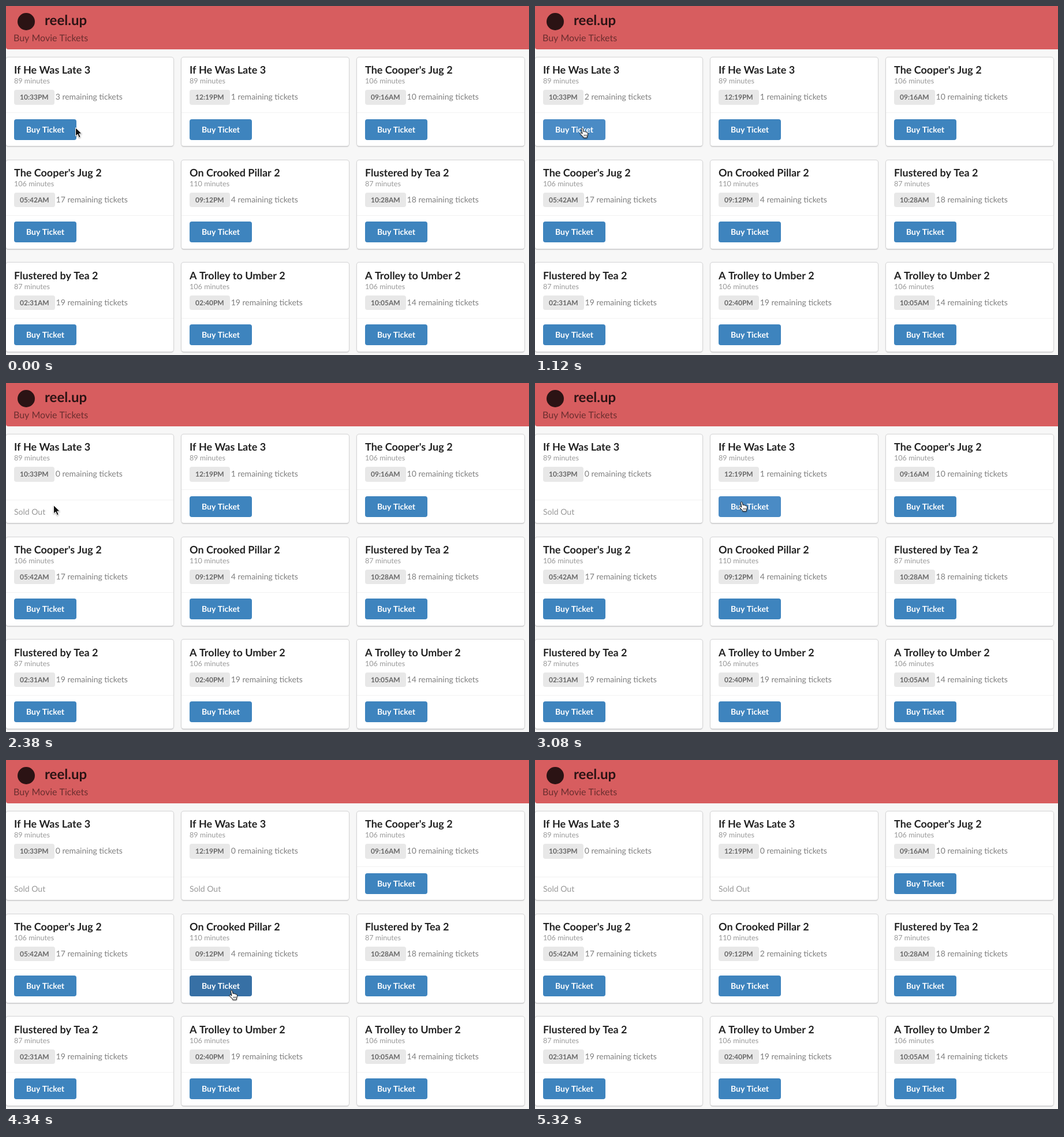
Recreate the animation shown at these times as an HTML page. Size 906 by 604 pixels, loop 6.35 s.

```html
<!DOCTYPE html>
<html lang="en">
<head>
<meta charset="utf-8">
<title>Buy Movie Tickets</title>
<style>
html, body { margin: 0; width: 100%; height: 100%; overflow: hidden; background: #f7f7f7; }
body { position: relative; font: 14px Lato, sans-serif; text-rendering: geometricPrecision; white-space: nowrap; }
body *, .cursor { position: absolute; }
header { left: 0; top: 0; width: 906px; height: 75px; background: #d75d5f; border-radius: 0 0 0 4px; }
.logo { left: 20px; top: 12px; width: 30px; height: 30px; border-radius: 50%; background: #2b1314; }
.brand { left: 67px; top: 10px; font: bold 24px/30px Lato, sans-serif; color: #2b1314; }
.tagline { left: 13px; top: 46px; font-size: 16px; line-height: 20px; color: #6b2e2f; }
.card { width: 290px; height: 153.5px; border-radius: 4px; background: #fff;
  box-shadow: 0 0 0 1px #d4d4d5, 0 2px 0 #d4d4d5, 0 1px 3px #d4d4d5; }
.card > * { left: 14px; }
.title { top: 11.35px; font: bold 18px/20px Lato, sans-serif; color: #222; }
.length { top: 33.4px; font-size: 12.6px; line-height: 16px; color: #999; }
.info { top: 56.4px; height: 25.3px; display: flex; color: #7f7f7f; }
.info * { position: static; line-height: 24px; }
.info .time { box-sizing: border-box; height: 25.3px; padding: 0 10px; margin-right: 2px; border-radius: 4px;
  background: #e8e8e8; font-size: 12px; line-height: 25px; font-weight: bold; color: #666; }
.card .rule { left: 0; top: 95.4px; width: 290px; height: 1px; background: #f2f2f2; }
.buy { top: 106.8px; width: 108px; height: 36px; border-radius: 4px; background: #3e84be;
  color: #fff; font-weight: bold; line-height: 36px; text-align: center; }
.gone { top: 124.7px; line-height: 18px; color: #999; display: none; }
.sold .rule { top: 113.4px; }
.sold .buy { display: none; }
.sold .gone { display: block; }
body i { position: static; display: inline-block; font-style: normal; }
.cursor { left: 0; top: 0; overflow: visible; filter: drop-shadow(0 1px 1px rgba(0,0,0,.35)); }
</style>
</head>
<body>
<header>
  <div class="logo"></div>
  <div class="brand">reel.up</div>
  <div class="tagline"><i>Buy</i> <i>Movie</i> <i>Tickets</i></div>
</header>
<svg id="arrow" class="cursor" width="14" height="20">
  <path d="M.5 .5V15.2L4 12 6.5 17.8 9.2 16.6 6.7 11H11.4Z" fill="#111" stroke="#fff"/>
</svg>
<svg id="hand" class="cursor" width="16" height="18">
  <path d="M3.5 2.2C3.2 .5 5.6 .2 6 2L7.2 6.6C8 5.6 9.6 6 9.7 7 10.6 6.3 12 6.8 12.1 7.8 13.2 7.4 14.3 8 14.4 9.2 14.6 11.5 14.2 13 13.3 15V17H6.8V15.6C5 14.2 3.2 11.8 1.4 10.4 .4 9.4 1.8 8 3.2 8.8L5 10.2Z" fill="#fff" stroke="#111" stroke-linejoin="round"/>
  <path d="M8.2 11.5V14.4M10.2 11.5V14.4M12.2 11.5V14.4" stroke="#111" stroke-width=".8"/>
</svg>
<script>
const LOOP = 6350;
const REST = '#3e84be', HOVER = '#4a8bc5', DOWN = '#3770a5';

// title, minutes, start time, tickets left
const films = [
  ['If He Was Late 3', 89, '10:33PM', 3],
  ['If He Was Late 3', 89, '12:19PM', 1],
  ["The Cooper's Jug 2", 106, '09:16AM', 10],
  ["The Cooper's Jug 2", 106, '05:42AM', 17],
  ['On Crooked Pillar 2', 110, '09:12PM', 4],
  ['Flustered by Tea 2', 87, '10:28AM', 18],
  ['Flustered by Tea 2', 87, '02:31AM', 19],
  ['A Trolley to Umber 2', 106, '02:40PM', 19],
  ['A Trolley to Umber 2', 106, '10:05AM', 14]
];

// time, cursor shape, x, y, card under the cursor, its button colour
const steps = [
  [0, 'arrow', 120, 210],
  [140, 'hand', 93, 210, 0, REST],
  [420, 'hand', 82, 211, 0, HOVER],
  [560, 'hand', 77, 211, 0, HOVER],
  [840, 'hand', 77, 211, 0, REST],
  [980, 'hand', 77, 211, 0, DOWN],
  [1120, 'hand', 77, 211, 0, HOVER],
  [1540, 'hand', 77, 211, 0, REST],
  [1680, 'hand', 77, 211, 0, DOWN],
  [1820, 'hand', 77, 211, 0, HOVER],
  [2100, 'hand', 77, 211, 0, REST],
  [2240, 'hand', 77, 211, 0, DOWN],
  [2380, 'arrow', 82, 211],
  [2800, 'arrow', 190, 209],
  [2940, 'hand', 330, 206, 1, REST],
  [3080, 'hand', 353, 205, 1, HOVER],
  [3360, 'hand', 353, 205, 1, DOWN],
  [3500, 'arrow', 358, 205],
  [3780, 'arrow', 376, 339],
  [3920, 'hand', 384, 385, 4, REST],
  [4060, 'hand', 386, 398, 4, HOVER],
  [4340, 'hand', 386, 398, 4, DOWN],
  [4480, 'hand', 386, 398, 4, HOVER],
  [4760, 'hand', 386, 398, 4, DOWN],
  [4900, 'hand', 386, 398, 4, HOVER],
  [5320, '']
];

// time, card
const sales = [[1120, 0], [1820, 0], [2380, 0], [3500, 1], [4480, 4], [4900, 4]];

// Separate boxes keep the font from kerning across spaces
const words = text => text.split(' ').map(w => `<i>${w}</i>`).join(' ');

const cursors = [arrow, hand];
const cards = films.map(([title, minutes, time], i) => {
  const el = document.createElement('div');
  el.className = 'card';
  el.style.left = i % 3 * 304 + 'px';
  el.style.top = 88.9 + Math.floor(i / 3) * 177.65 + 'px';
  el.innerHTML = `<div class="title">${words(title)}</div>
    <div class="length">${words(minutes + ' minutes')}</div>
    <div class="info"><span class="time">${time}</span><span class="left"></span></div>
    <div class="rule"></div>
    <div class="buy">${words('Buy Ticket')}</div>
    <div class="gone">${words('Sold Out')}</div>`;
  arrow.before(el);
  return { el, left: el.querySelector('.left'), buy: el.querySelector('.buy') };
});

function draw([t, shape, x = 0, y = 0, over, colour]) {
  cards.forEach(({ el, left, buy }, i) => {
    const count = films[i][3] - sales.filter(([at, card]) => card === i && at <= t).length;
    left.innerHTML = words(count + ' remaining tickets');
    el.classList.toggle('sold', !count);
    buy.style.background = i === over ? colour : REST;
  });
  for (const c of cursors) {
    c.style.display = c.id === shape ? 'block' : 'none';
    c.style.transform = `translate(${x}px, ${y}px)`;
  }
}

const start = performance.now();
let shown;
function tick() {
  const t = (performance.now() - start) % LOOP;
  const step = steps.findLast(s => s[0] <= t);
  if (step !== shown) draw(step);
  shown = step;
  requestAnimationFrame(tick);
}
tick();
</script>
</body>
</html>
```
